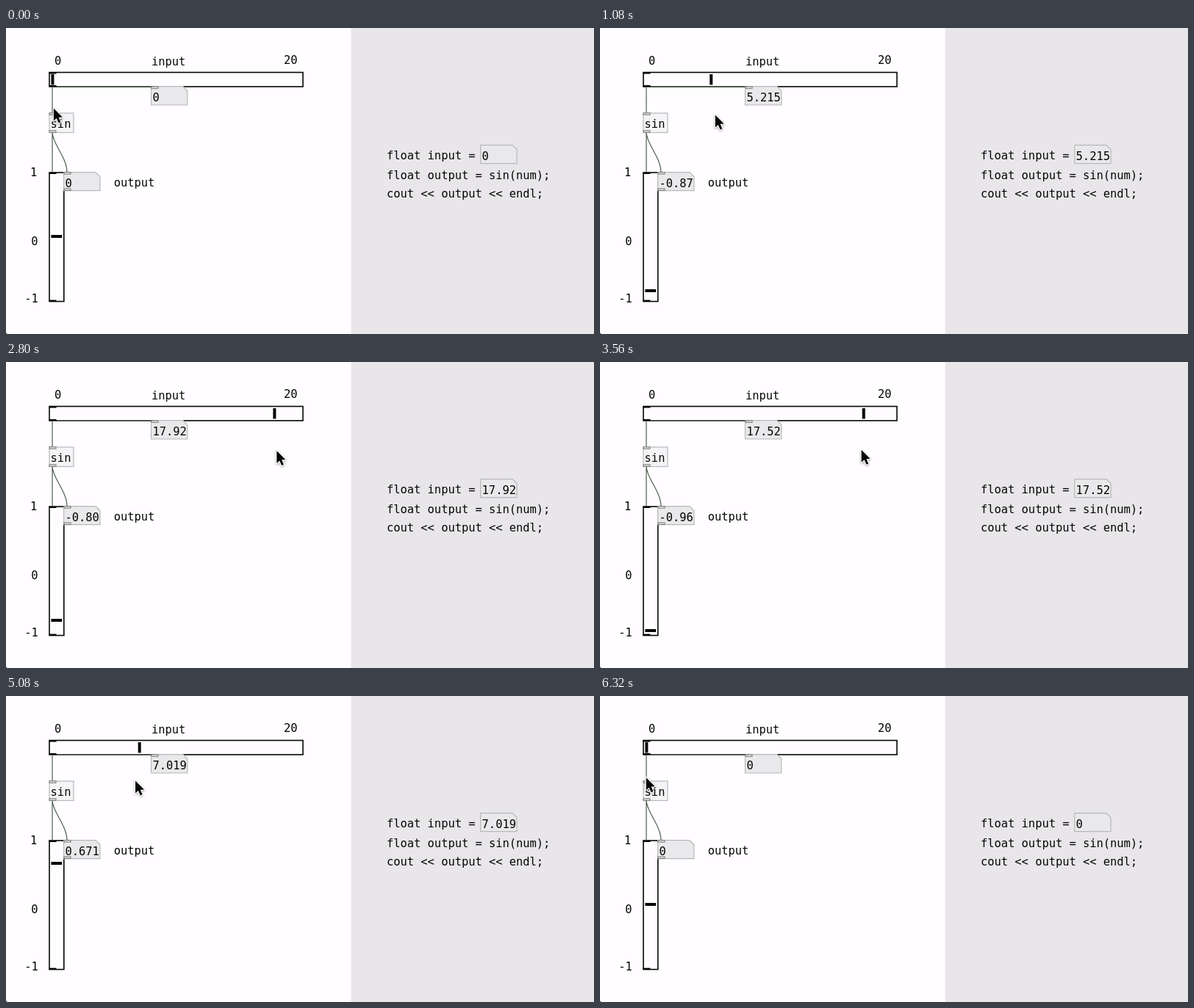
Write an HTML page with a canvas that moves like this. It is 800 px wide and 417 px high and loops after 6360 ms.

```html
<!DOCTYPE html>
<html>
<head>
<meta charset="utf-8">
<title>Sine slider</title>
<style>
html, body { margin: 0; width: 100%; height: 100%; overflow: hidden; background: #fffdff; }
canvas { display: block; }
</style>
</head>
<body>
<canvas id="stage" width="800" height="417"></canvas>
<script>
const ctx = document.getElementById('stage').getContext('2d');
const LOOP = 6360, STEP = 40, LEAD = 45;
const INK = '#050505', PAPER = '#fffdff', GREEN = '#4c5f4e', EDGE = '#b9b8ba';
const ARROW = new Path2D('M0 0V17L3.9 13.5L6.8 20L9.6 18.8L6.8 12.4L12 12Z');

// Turning points of the drag: [ms, slider value]
const DRAG = [
  [0, 0], [1080, 5.215], [1880, 11.25], [2800, 17.92], [3180, 18.75],
  [3560, 17.528], [4480, 12], [5080, 7.019], [6240, 0], [LOOP, 0]
];

// Monotone cubic through the key points
function follow(keys, t) {
  const last = keys.length - 2;
  const rate = k => (keys[k + 1][1] - keys[k][1]) / (keys[k + 1][0] - keys[k][0]);
  const slope = k => {
    if (k === 0 || k > last) return 0;
    const a = rate(k - 1), b = rate(k);
    return a * b <= 0 ? 0 : 2 * a * b / (a + b);
  };
  let i = 0;
  while (i < last && t > keys[i + 1][0]) i++;
  const [t0, v0] = keys[i], [t1, v1] = keys[i + 1];
  const h = t1 - t0, s = Math.min(1, (t - t0) / h), r = 1 - s;
  return r * r * (1 + 2 * s) * v0 + s * s * (3 - 2 * s) * v1 +
    h * s * r * (r * slope(i) - s * slope(i + 1));
}

const sliderX = v => 63.6 + 16.85 * v;

function digits(v) {
  return Math.abs(v) < 0.0005 ? '0' : String(Number(v.toPrecision(6))).slice(0, 5);
}

function text(str, x, y) {
  ctx.fillStyle = INK;
  ctx.fillText(str, x, y);
}

function line(color, width, path) {
  ctx.strokeStyle = color;
  ctx.lineWidth = width;
  ctx.stroke(new Path2D(path));
}

function box(x, y, w, h, fill, edge, width) {
  ctx.fillStyle = fill;
  ctx.fillRect(x, y, w, h);
  ctx.strokeStyle = edge;
  ctx.lineWidth = width;
  ctx.strokeRect(x, y, w, h);
}

const port = (x, y) => box(x + 0.5, y + 0.5, 9, 2.5, '#e4e4e4', '#777', 1);

function numberBox(x, y, h, value) {
  const path = `M${x} ${y}h43.3l6 6v${h - 6}h-49.3z`;
  ctx.fillStyle = '#e9e8ea';
  ctx.fill(new Path2D(path));
  line(EDGE, 1.2, path);
  text(digits(value), x + 1.9, y + h - 5);
}

function slider(x, y, w, h) {
  box(x, y, w, h, PAPER, INK, 1.6);
  ctx.fillStyle = INK;
  ctx.fillRect(x - 0.5, y, 10, 2);
  ctx.fillRect(x - 0.5, y + h - 2, 10, 2);
}

function pointer(x, y) {
  ctx.save();
  ctx.translate(x, y);
  ctx.strokeStyle = '#fff';
  ctx.lineWidth = 2.4;
  ctx.lineJoin = 'round';
  ctx.shadowColor = 'rgba(0, 0, 0, 0.35)';
  ctx.shadowBlur = 3;
  ctx.shadowOffsetY = 1;
  ctx.stroke(ARROW);
  ctx.shadowColor = 'transparent';
  ctx.fillStyle = INK;
  ctx.fill(ARROW);
  ctx.restore();
}

function labels() {
  text('0', 66, 50);
  text('input', 198, 51);
  text('20', 378, 48.7);
  text('1', 33, 202.4);
  text('0', 34.3, 296.4);
  text('-1', 25.3, 374.4);
  text('output', 146.7, 215.6);
  text('float input =', 518, 178.9);
  text('float output = sin(num);', 518, 206.4);
  text('cout << output << endl;', 518, 231.4);
}

function draw(t) {
  const value = follow(DRAG, t), result = Math.sin(value);

  ctx.fillStyle = PAPER;
  ctx.fillRect(0, 0, 800, 417);
  ctx.fillStyle = '#e8e6e9';
  ctx.fillRect(469.5, 0, 330.5, 417);
  ctx.fillStyle = INK;
  ctx.fillRect(0, 416, 1, 1);
  labels();

  slider(59, 60.5, 345, 19.4);
  slider(59, 197, 19.8, 175.6);
  numberBox(197.5, 79.6, 25.4, value);
  numberBox(78.6, 196.6, 25, result);
  numberBox(645.7, 159.6, 25, value);
  box(59, 116, 33, 26.5, '#f4f4f6', EDGE, 1.2);
  text('sin', 60.6, 136);

  line(GREEN, 1.2, 'M63 80V116M63 142V197M63 142C63 158 83 176 83 197');
  line(GREEN, 1.5, 'M69 80H202');
  port(197.5, 79.3);
  port(58.5, 115.3);
  port(58.5, 139.3);
  port(78.5, 196);
  port(78.5, 218.5);

  ctx.fillStyle = INK;
  ctx.fillRect(sliderX(value) - 2.2, 63, 4, 14.4);
  ctx.fillRect(61.4, Math.round(282.3 - 84 * result), 14.8, 4);

  // The hand runs slightly ahead of the slider along a shallow arc
  const u = t / LOOP;
  const ahead = follow(DRAG, Math.min(t + LEAD, LOOP));
  pointer(sliderX(ahead) + 1 - 1.8 * u,
    109.5 + 1.5 * u + 11 * Math.sin(Math.PI * u ** 0.7));
}

ctx.font = '15.4px "DejaVu Sans Mono", monospace';
const start = performance.now();
function tick() {
  const t = (performance.now() - start) % LOOP;
  draw(Math.floor(t / STEP) * STEP);
  requestAnimationFrame(tick);
}
tick();
</script>
</body>
</html>
```
